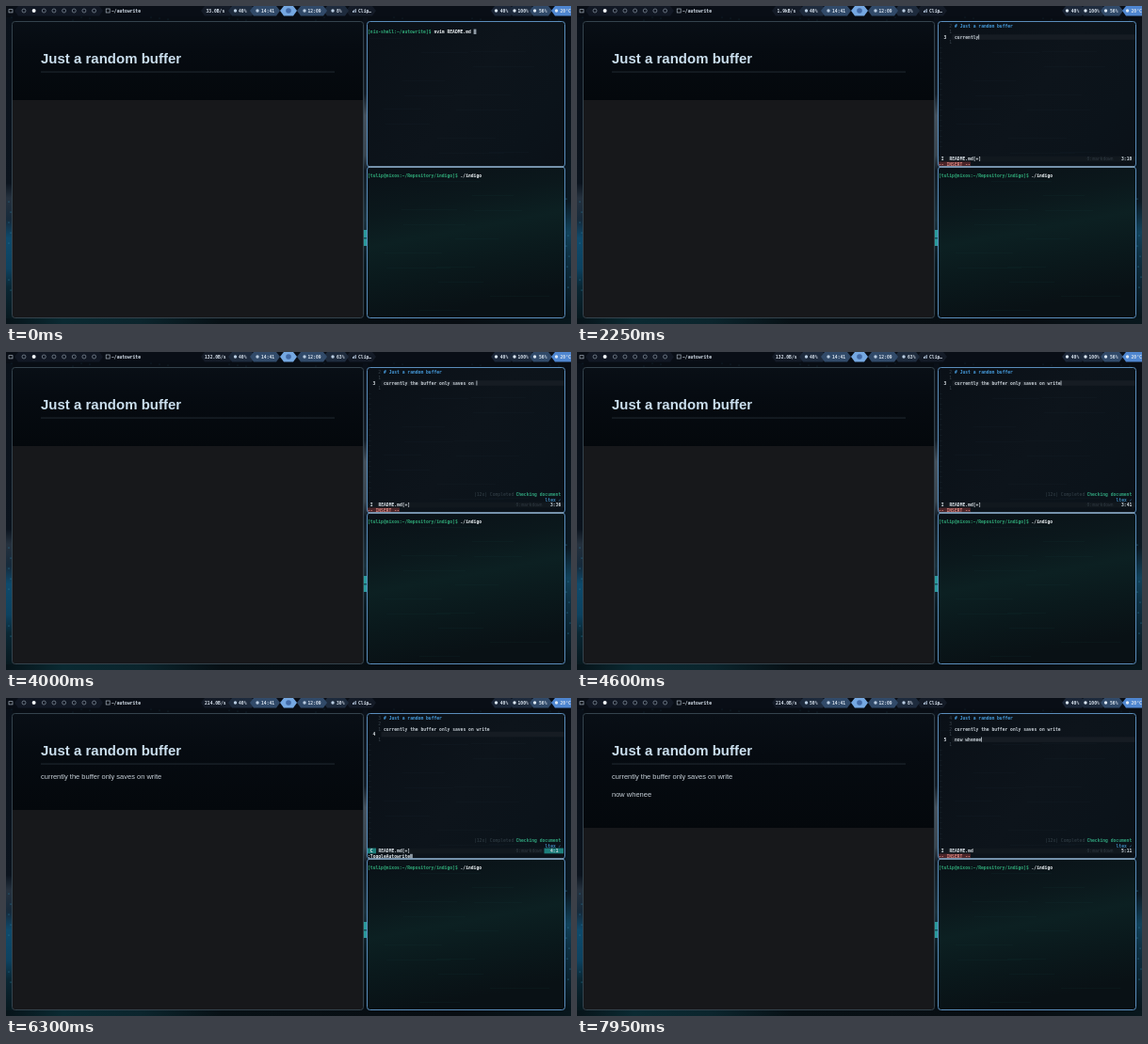
An HTML page with a canvas for the animation above (8000 ms loop, 600 by 338 pixels).

```html
<!DOCTYPE html>
<html lang="en">
<head>
<meta charset="utf-8">
<title>Autowrite demo</title>
<style>
html, body { margin: 0; width: 100%; height: 100%; overflow: hidden; background: #070b11; }
canvas { display: block; width: 100vw; height: 100vh; }
</style>
</head>
<body>
<canvas id="stage"></canvas>
<script>
const W = 600, H = 338, LOOP = 8000;
const CELL = 2.815, ROW = 5.55;
const MONO = '"DejaVu Sans Mono", monospace';
const SANS = '"Liberation Sans", Arial, sans-serif';
const canvas = document.getElementById('stage');
const dpr = window.devicePixelRatio || 1;
canvas.width = W * dpr;
canvas.height = H * dpr;
const ctx = canvas.getContext('2d');

const LINE_A = 'currently the buffer only saves on write';
const LINE_B = 'now whenee';
const COMMAND = ':ToggleAutowrite';

// Latest value whose start time has passed.
const at = (t, steps) => steps.reduce((v, [start, val]) => (t >= start ? val : v), steps[0][1]);
const typed = (s, t, start, pace) => s.slice(0, Math.max(0, Math.floor((t - start) / pace)));

function rect(x, y, w, h, fill) {
  ctx.fillStyle = fill;
  ctx.fillRect(x, y, w, h);
}

// Text is laid out ten times larger so small sizes keep exact advances.
function text(s, x, y, size, color, family, weight = 'normal') {
  ctx.save();
  ctx.translate(x, y);
  ctx.scale(0.1, 0.1);
  ctx.font = `${weight} ${size * 10}px ${family}`;
  ctx.fillStyle = color;
  ctx.fillText(s, 0, 0);
  ctx.restore();
}

const mono = (s, x, y, color, weight = 'bold') => text(s, x, y, 4.675, color, MONO, weight);

function gradient(x0, y0, x1, y1, stops) {
  const g = ctx.createLinearGradient(x0, y0, x1, y1);
  stops.forEach(([p, c]) => g.addColorStop(p, c));
  return g;
}

function roundBox(x, y, w, h, r, fill, stroke) {
  ctx.beginPath();
  ctx.roundRect(x, y, w, h, r);
  if (fill) { ctx.fillStyle = fill; ctx.fill(); }
  if (stroke) { ctx.strokeStyle = stroke; ctx.lineWidth = 1; ctx.stroke(); }
}

function dot(x, y, r, color, hollow) {
  ctx.beginPath();
  ctx.arc(x, y, r, 0, Math.PI * 2);
  if (hollow) { ctx.strokeStyle = color; ctx.lineWidth = 0.7; ctx.stroke(); }
  else { ctx.fillStyle = color; ctx.fill(); }
}

function hex(x0, x1, fill) {
  ctx.beginPath();
  [[x0, 5], [x0 + 4, 0], [x1 - 4, 0], [x1, 5], [x1 - 4, 10.5], [x0 + 4, 10.5]]
    .forEach(([x, y]) => ctx.lineTo(x, y));
  ctx.fillStyle = fill;
  ctx.fill();
}

function wallpaper() {
  rect(0, 0, W, H, '#080d14');
  rect(0, 12, 7, 326, gradient(0, 12, 0, H, [
    [0, '#091019'], [0.54, '#0b131d'], [0.59, '#25313e'], [0.66, '#162a3b'],
    [0.72, '#0e4a6c'], [0.82, '#0d4260'], [0.88, '#0a2734'], [1, '#07161b']]));
  rect(379, 12, 5, 326, gradient(0, 12, 0, H, [
    [0, '#0a1019'], [0.25, '#151e28'], [0.32, '#46525e'], [0.45, '#3b4752'],
    [0.5, '#121c26'], [0.66, '#1d3440'], [0.8, '#0a1a22'], [1, '#060c11']]));
  rect(380, 238, 3, 17, '#2b9a9c');
  rect(380, 246, 3, 1.5, '#174f59');
  rect(593, 12, 7, 326, gradient(0, 12, 0, H, [
    [0, '#080d15'], [0.6, '#0b1923'], [0.7, '#12435c'], [0.78, '#0e3043'], [1, '#061117']]));
  rect(0, 332, W, 6, gradient(0, 0, W, 0, [
    [0, '#071319'], [0.1, '#0a2a32'], [0.24, '#0b252d'], [0.38, '#071015'], [0.8, '#080d12'], [1, '#08171d']]));
  for (let i = 0; i < 14; i++) {
    const y = 205 + (i * 47) % 105;
    dot(i % 2 ? 2 + i % 4 : 595 + i % 5, y, 0.6, '#2d7fa0');
  }
  for (let i = 0; i < 18; i++) dot(6 + (i * 83) % 590, 12 + (i * 5) % 4, 0.4, '#245063');
}

function topBar(t) {
  const ink = '#d9e3ee';
  rect(0, 0, W, 11, '#090e16');
  ctx.strokeStyle = '#aab5c0';
  ctx.lineWidth = 0.7;
  ctx.strokeRect(3, 3.7, 4, 3.2);
  hex(9, 103, '#121824');
  for (let i = 0; i < 8; i++) {
    const x = 19 + i * 10.65;
    dot(x, 5, 2, i === 1 ? '#f4f8fb' : '#8995a3', i !== 1);
  }
  ctx.strokeStyle = '#aab5c0';
  ctx.strokeRect(106.2, 3, 4, 4);
  mono('~/autowrite', 112, 6.7, ink);

  const net = at(t, [[0, '33.0B/s'], [400, '1.9kB/s'], [3700, '132.0B/s'], [5700, '214.0B/s']]);
  const cpu = at(t, [[0, '40%'], [7800, '50%']]);
  const load = at(t, [[0, '8%'], [3000, '63%'], [5300, '30%'], [7800, '8%']]);
  hex(207, 242, '#141b27');
  hex(361, 393, '#141b27');
  hex(236, 265, '#1e2b3d');
  hex(337, 364, '#1e2b3d');
  hex(259, 291, '#314a69');
  hex(309, 341, '#314a69');
  hex(291, 309, '#75a8e2');
  dot(300, 5, 2.8, '#4169a6');
  mono(net, net.length > 7 ? 211 : 212.5, 6.7, ink);
  [[243.5, cpu, 247], [267, '14:41', 271], [317, '12:09', 320.5], [347, load, 351]]
    .forEach(([x, s, tx]) => {
      dot(x, 5, 1.7, '#b8cbe0');
      mono(s, tx, 6.7, ink);
    });
  [2, 3, 4].forEach((h, i) => rect(368 + i * 1.4, 7 - h, 0.9, h, '#b8cbe0'));
  mono('Clip…', 374, 6.7, ink);

  hex(515, 540, '#1b2637');
  hex(534, 562, '#1e2b3d');
  hex(556, 580, '#314a69');
  hex(579, 608, '#4f86d0');
  [[520.5, '40%', 524.8], [540, '100%', 543.5], [561.5, '56%', 566], [584.5, '20°C', 588.5]]
    .forEach(([x, s, tx]) => {
      dot(x, 5, 1.7, '#dbe7f4');
      mono(s, tx, 6.7, ink);
    });
}

function preview(t) {
  const paraB = typed(LINE_B, t, 7050, 85);
  const saved = t >= 5200;
  const edge = paraB ? 138 : saved ? 119 : 100;
  roundBox(6.5, 16.5, 373, 315, 3, '#17181b');
  ctx.save();
  ctx.clip();
  rect(7, 17, 372, edge - 17, gradient(0, 17, 0, edge, [[0, '#090f16'], [0.35, '#060b11'], [1, '#04080c']]));
  ctx.restore();
  roundBox(6.5, 16.5, 373, 315, 3, null, '#34434d');
  text('Just a random buffer', 37, 61.4, 15, '#cbdfee', SANS, 'bold');
  rect(37, 69.6, 312, 0.9, '#252e36');
  if (saved) text(LINE_A, 37, 86.2, 7.5, '#c7d0d8', SANS);
  if (paraB) text(paraB, 37, 105, 7.5, '#c7d0d8', SANS);
}

function prompt(s, command, y) {
  mono(s, 384, y, '#2fa877');
  mono(command, 384 + (s.length + 1) * CELL, y, '#eef3f6');
}

function fidget(t) {
  if (t < 2400) return;
  const done = t >= 3900;
  const note = done ? '(12x) Completed' : 'file:///home/tulip/autowrite/README.md';
  mono(note, 539.2 - note.length * CELL, 153.2, '#35424a', 'normal');
  mono('Checking document', 541.4, 153.2, '#2f9f7a');
  const spin = done ? '✓' : '.'.repeat(1 + Math.floor(t / 150) % 3);
  mono('ltex ' + spin, 572.5, 158.6, '#3d86b8');
}

function editor(t) {
  const row = at(t, [[0, 1], [900, 2], [1450, 3], [5400, 4], [6750, 5]]);
  const mode = at(t, [[0, 'N'], [900, 'I'], [4750, 'N'], [4950, 'C'], [5150, 'N'],
    [5400, 'I'], [5650, 'N'], [5700, 'C'], [6450, 'N'], [6750, 'I']]);
  const dirty = at(t, [[0, false], [900, true], [5150, false], [5400, true], [6750, false]]);
  const lines = ['# Just a random buffer', '', typed(LINE_A, t, 1600, 68), '', typed(LINE_B, t, 7050, 85)];
  const baseline = n => 23.4 + (n - 1) * ROW;

  rect(398.5, baseline(row) - 4.2, 194, ROW, '#161c23');
  for (let n = 1; n <= 24; n++) {
    const y = baseline(n);
    if (n === row) mono(String(n), 389.6, y, '#dfe5ea');
    else if (n <= row + 1) mono(String(Math.abs(n - row)), 395.3, y, '#39444d', 'normal');
    else mono('~', 385, y, '#1e2830', 'normal');
    if (n <= row) mono(lines[n - 1] || '', 401, y, n === 1 ? '#469bdc' : '#c4ccd3');
  }
  const col = row === 1 ? 0 : lines[row - 1].length;
  const x = 401 + col * CELL;
  if (mode === 'I') rect(x, baseline(row) - 4, 0.8, 5, '#c9d2d9');
  else if (mode === 'N') rect(x - (col ? CELL : 0), baseline(row) - 4, CELL, 5, '#8e99a3');
  fidget(t);

  rect(384, 159.6, 209, 5.7, '#11181e');
  if (mode === 'C') {
    rect(384, 159.6, 9, 5.7, '#1d7f7c');
    rect(571.5, 159.6, 20.5, 5.7, '#1d7f7c');
  }
  mono(mode, 386.8, 164, '#e3eaef');
  mono('README.md' + (dirty ? '[+]' : ''), 395.4, 164, '#d9e0e6');
  mono('0:markdown', 541.5, 164, '#303a42', 'normal');
  mono(`${row}:${col + 1}`, 578, 164, '#d0d9e0');

  if (mode === 'I') {
    rect(384, 165.5, 34, 5.2, '#4b2529');
    mono('-- INSERT --', 384, 169.8, '#dc8680');
  } else if (mode === 'C') {
    const cmd = t < 5400 ? ':w'.slice(0, t < 5030 ? 1 : 2) : typed(COMMAND, t, 5670, 34);
    mono(cmd, 384, 169.8, '#e6ecf0');
    rect(384 + cmd.length * CELL, 165.8, CELL, 4.9, '#8e99a3');
  }
}

function terminals(t) {
  const frame = '#5a8dbb';
  roundBox(383.5, 16.5, 210, 154.5, 3,
    gradient(383, 16, 593, 171, [[0, '#0a1017'], [0.5, '#0d141b'], [0.8, '#0b131a'], [1, '#0b1118']]));
  roundBox(383.5, 171, 210, 160.5, 3,
    gradient(400, 171, 430, 331, [[0, '#0a1117'], [0.3, '#0b181c'], [0.5, '#0c2022'], [0.72, '#0a191c'], [1, '#091115']]));
  ctx.save();
  ctx.globalAlpha = 0.25;
  for (let i = 0; i < 26; i++) {
    const y = 34 + (i * 61) % 290;
    if (y > 160 && y < 186) continue;
    rect(386 + (i * 37) % 130, y, 35 + (i * 17) % 35, 0.7, y > 175 ? '#14363a' : '#1b2833');
  }
  ctx.restore();
  if (t < 500) {
    prompt('[nix-shell:~/autowrite]$', 'nvim README.md', 28.8);
    rect(384 + 40 * CELL, 24.6, CELL, 5.4, '#8e99a3');
  } else {
    editor(t);
  }
  prompt('[tulip@nixos:~/Repository/indigo]$', './indigo', 181.6);
  roundBox(383.5, 16.5, 210, 154.5, 3, null, frame);
  roundBox(383.5, 171, 210, 160.5, 3, null, frame);
  rect(385, 170.5, 207, 1, '#a3b6c5');
}

function draw(now) {
  const t = now % LOOP;
  ctx.setTransform(dpr, 0, 0, dpr, 0, 0);
  wallpaper();
  topBar(t);
  preview(t);
  terminals(t);
}

const start = performance.now();
function tick() {
  draw(performance.now() - start);
  requestAnimationFrame(tick);
}
tick();
</script>
</body>
</html>
```
